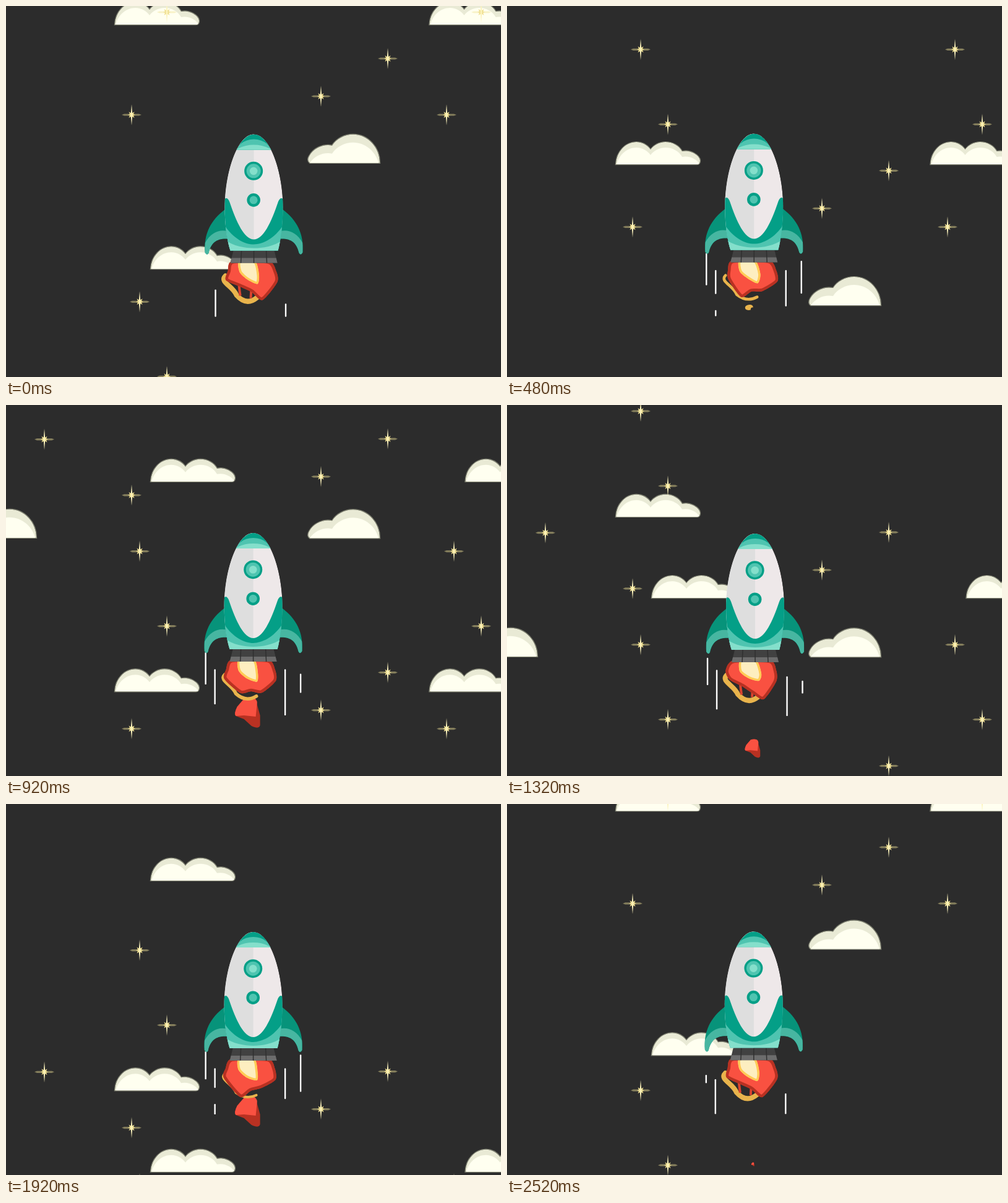
Animation of 800x600 px, one loop 2.56 s. Source, as an HTML page with a canvas:

```html
<!DOCTYPE html>
<html lang="en">
<head>
<meta charset="utf-8">
<title>Rocket</title>
<style>
html, body { margin: 0; width: 100%; height: 100%; overflow: hidden; background: #2c2c2c; }
canvas { display: block; }
</style>
</head>
<body>
<canvas id="stage" width="800" height="600"></canvas>
<script>
const ctx = document.getElementById('stage').getContext('2d');
const STEP = 40, STEPS = 64, BEAT = 25, TAU = Math.PI * 2;
const DARK = '#049f87', MID = '#4fc4b0', LIGHT = '#84dfcb';
const RED = '#f95141', DEEP = '#b83122', GOLD = '#e9b44c';

// Cosine that runs a whole number of turns per loop.
const wave = (n, turns, shift = 0) => Math.cos(TAU * (n * turns / STEPS + shift));

function fill(path, color) {
  ctx.fillStyle = color;
  ctx.fill(path);
}

function at(x, y, scale, paint) {
  ctx.save();
  ctx.translate(x, y);
  ctx.scale(scale, Math.abs(scale));
  paint();
  ctx.restore();
}

function oval(x, y, rx, ry, color) {
  ctx.fillStyle = color;
  ctx.beginPath();
  ctx.ellipse(x, y, rx, ry, 0, 0, TAU);
  ctx.fill();
}

// Smooth closed curve through a list of points.
function blob(pts) {
  const p = new Path2D(), n = pts.length;
  const get = i => pts[(i + n) % n];
  p.moveTo(...pts[0]);
  for (let i = 0; i < n; i++) {
    const [q, r, s, t] = [get(i - 1), get(i), get(i + 1), get(i + 2)];
    p.bezierCurveTo(r[0] + (s[0] - q[0]) / 8, r[1] + (s[1] - q[1]) / 8,
      s[0] - (t[0] - r[0]) / 8, s[1] - (t[1] - r[1]) / 8, ...s);
  }
  p.closePath();
  return p;
}

function rimmed(path, color, rim, width) {
  ctx.save();
  ctx.clip(path);
  fill(path, color);
  ctx.strokeStyle = rim;
  ctx.lineWidth = width * 2;
  ctx.stroke(path);
  ctx.restore();
}

// Paint a column of copies, one beat apart, falling and wrapping once per loop.
function fall(x, y, count, speed, first, paint) {
  const span = speed * STEPS;
  return n => {
    for (let i = 0; i < count; i++) {
      const d = y + speed * (n - BEAT * i) - first;
      at(x, (d % span + span) % span + first, 1, paint);
    }
  };
}

// Sky
const beamV = new Path2D('M0 -17L1.4 0L0 17L-1.4 0Z');
const beamH = new Path2D('M-16 0L-12 -1.6H12L16 0L12 1.6H-12Z');
const spark = new Path2D('M0 -6L1.5 -3L4.5 -5L3 -1L6 0L3 1L4.5 5L1.5 3L0 6L-1.5 3L-4.5 5L-3 1L-6 0L-3 -1L-4.5 -5L-1.5 -3Z');

function paintStar() {
  fill(beamH, 'rgba(240,226,150,.45)');
  fill(spark, '#efdf92');
  fill(beamV, '#fdf4bd');
}

const triple = new Path2D('M0 0C1 -21 16 -36 33 -36C43 -36 51 -31 56 -24C61 -31 70 -36 80 -36C92 -36 102 -30 107 -21C121 -24 136 -14 136 -6Q136 0 131 0Z');
const double = new Path2D('M3 0Q-2 -4 2 -11C9 -24 25 -31 39 -28C46 -39 59 -46 73 -46C97 -46 116 -25 116 0Z');

function cloud(shape, inset) {
  return () => {
    ctx.strokeStyle = 'rgba(150,152,132,.75)';
    ctx.lineWidth = 2.4;
    ctx.stroke(shape);
    ctx.save();
    ctx.clip(shape);
    fill(shape, '#e9ead5');
    ctx.translate(0, inset);
    fill(shape, '#fffff0');
    ctx.restore();
  };
}

const wide = cloud(triple, 9), tall = cloud(double, 13);
const sky = [
  ...[[176, 30, 2], [684.5, 30, 1], [234, -309.6, 2], [742.5, -309.6, 1]]
    .map(c => fall(...c, 18.84, 5, wide)),
  ...[[488, 253.7, 2], [-67, -226.8, 1]].map(c => fall(...c, 19.2, 5, tall)),
  ...[[62, -292, 1], [203, 176, 2], [216, -111, 2], [260, 10, 2], [509, 146, 2],
    [617, 85, 2], [712, 176, 1], [724, -111, 1], [768, 10, 1]]
    .map(s => fall(...s, 15.11, -20, paintStar))
];

// Rocket
const hull = new Path2D('M400 207C373 207 353 270 353 325C353 355 357 380 362 395H439C443 380 447 355 447 325C447 270 427 207 400 207Z');
const skirts = [
  ['M350 316Q356 304 361 317C372 350 385 377 400 377C415 377 428 350 439 317Q444 304 450 316V400H350Z', DARK],
  ['M350 350C365 375 385 385 400 385S435 375 450 350V400H350Z', MID],
  ['M350 375C365 388 385 391 400 391S435 388 450 375V400H350Z', LIGHT]
].map(([d, c]) => [new Path2D(d), c]);
const fin = new Path2D('M354 328C330 346 319 368 321 398Q324 404 327 399C331 382 340 375 358 376Z');
const finLow = new Path2D('M321 383C330 366 345 360 358 364V376C340 375 331 382 327 399Q324 404 321 398Z');

function drawFin() {
  fill(fin, '#07937a');
  ctx.save();
  ctx.clip(fin);
  fill(finLow, '#47b6a1');
  ctx.restore();
}

function drawRocket() {
  drawFin();
  at(800, 0, -1, drawFin);

  fill(new Path2D('M367 395H433L438 415H362Z'), '#414141');
  fill(new Path2D('M364 407H436L438 415H362Z'), '#6c6c6c');
  ctx.strokeStyle = '#303030';
  ctx.lineWidth = 1.5;
  ctx.stroke(new Path2D('M380 395L379 415M400 395V415M420 395L421 415'));

  ctx.save();
  ctx.clip(hull);
  fill(hull, '#eee8e9');
  ctx.fillStyle = '#dedede';
  ctx.fillRect(350, 200, 50, 200);
  skirts.forEach(([p, c]) => fill(p, c));
  ctx.beginPath();
  ctx.rect(350, 200, 100, 32);
  ctx.clip();
  fill(hull, DARK);
  oval(400, 240, 30, 25, MID);
  oval(400, 242, 34, 18, LIGHT);
  ctx.restore();

  for (const [y, ...radii] of [[266.3, 15, 11.5, 6.3], [313.3, 10.8, 6.5]]) {
    radii.forEach((r, i) => oval(399.6, y, r, r, [DARK, MID, LIGHT][i]));
  }
}

// Speed lines: the head eases out, the tail follows at an even speed.
const CYCLE = STEPS / 7;
const dashes = [
  { x: 323, top: 400, end: 452, head: .3, pace: 30, tail: 4.9 },
  { x: 338, top: 427.5, end: 502, head: .8, pace: 25, tail: 6.6 },
  { x: 451.5, top: 427.5, end: 502, head: .5, pace: 35, tail: 4.7 },
  { x: 476.5, top: 401, end: 465.5, head: .2, pace: 42, tail: 1.9 }
];

function drawDashes(n) {
  ctx.strokeStyle = '#fff';
  ctx.lineWidth = 2.4;
  ctx.lineCap = 'round';
  for (const d of dashes) {
    for (const turn of [0, CYCLE]) {
      const p = n % CYCLE + turn;
      const a = d.top + 12 * Math.max(0, p - d.tail) + 1;
      const b = Math.min(d.end, d.top + d.pace * Math.max(0, p - d.head) ** .6) - 1;
      if (b < a) continue;
      ctx.beginPath();
      ctx.moveTo(d.x, a);
      ctx.lineTo(d.x, b);
      ctx.stroke();
    }
  }
  ctx.lineCap = 'butt';
}

// Flame
const chunk = new Path2D('M-5 -24Q4 -27 11 -24Q16 -20 15 -14L20 4V20Q18 27 6 21L-6 10L-19 5Q-23 2 -17 -10Z');
const chunkLit = new Path2D('M-5 -24Q4 -27 11 -24Q16 -20 15 -14L13 6L-6 4L-19 5Q-23 2 -17 -10Z');
const drop = new Path2D('M-13 0Q-12 -8 2 -9Q13 -9 13 0Q5 -2 5 8Q-13 11 -13 0Z');

function drawDebris(n) {
  for (const start of [BEAT - 2, BEAT * 2 - 2]) {
    const m = n - start;
    const size = m < 0 ? 1 + m / 6 : 1 - (m / 16) ** 2;
    if (size > 0) at(391 + m * .5, 498 + m * 5.7, size, () => {
      fill(chunk, DEEP);
      fill(chunkLit, RED);
    });
  }
  for (const start of [14, 14 + BEAT]) {
    const m = n - start;
    const size = 1 - Math.abs(m) / 4;
    if (size > 0) at(392, 498 + m * 5, size, () => fill(drop, GOLD));
  }
}

function drawFlame(n) {
  const sway = wave(n, 2), lick = wave(n, 5), puff = wave(n, 3, .3);
  drawDebris(n);

  ctx.strokeStyle = GOLD;
  ctx.lineWidth = 6 + 2 * sway;
  ctx.lineCap = 'round';
  ctx.stroke(new Path2D(`M354 436C344 446 366 452 372 467Q388 ${482 + 3 * sway} 405 471`));
  ctx.lineCap = 'butt';

  // Drips reach down while the flame leans right.
  const reach = 16 * Math.max(0, sway);
  ctx.strokeStyle = '#d9432f';
  ctx.lineWidth = 4;
  ctx.stroke(new Path2D(`M376 452l2 ${reach}M396 456l-1 ${reach}`));

  rimmed(blob([
    [365, 412], [424, 412], [435 + lick, 428], [436 + 2 * lick, 446],
    [414, 467 + 8 * sway], [396, 464 - 2 * lick], [379, 464 - 10 * sway],
    [356 + 4 * puff, 443], [355 + 3 * lick, 428]
  ]), RED, DEEP, 4.5);
  rimmed(blob([
    [376, 412], [402, 412], [409 + 2 * puff, 434], [406, 447 + 2 * lick],
    [390, 442 - puff], [376 + lick, 430]
  ]), '#fdeec0', '#ffcb55', 3.5);
}

function draw(n) {
  ctx.fillStyle = '#2c2c2c';
  ctx.fillRect(0, 0, 800, 600);
  sky.forEach(paint => paint(n));
  const bob = Math.cos(TAU * (n - 4.6) / BEAT);
  ctx.save();
  ctx.translate(1.9 * bob - .2, 1.4 * bob);
  drawFlame(n);
  drawDashes(n);
  drawRocket();
  ctx.restore();
}

const begin = performance.now();
function tick() {
  draw(Math.floor((performance.now() - begin) / STEP) % STEPS);
  requestAnimationFrame(tick);
}
tick();
</script>
</body>
</html>
```
